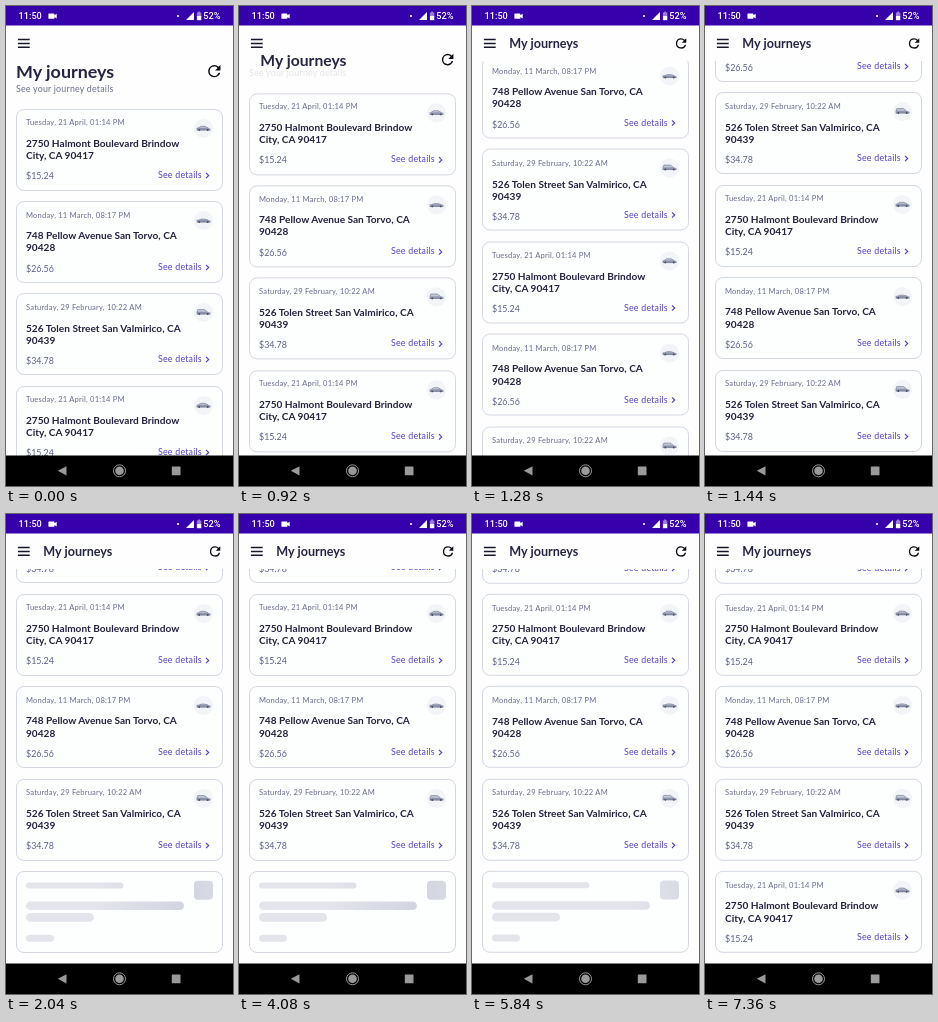
An HTML page for the animation above (8.04 s loop, 227 px wide and 480 px high).

```html
<!DOCTYPE html>
<html lang="en">
<head>
<meta charset="utf-8">
<title>My journeys</title>
<style>
  html, body { margin: 0; width: 100%; height: 100%; overflow: hidden; background: #fff; }
  #stage { position: relative; width: 227px; height: 480px; overflow: hidden; background: #fdfefd; font-family: Lato, sans-serif; }
  #stage * { position: absolute; white-space: nowrap; }
  #stage br { position: static; }
  svg { left: 0; top: 0; overflow: visible; }

  .clock { top: 5px; color: #fff; font: 500 9.2px/10px Roboto, sans-serif; }

  #title { left: 10px; top: 55px; font-weight: 700; font-size: 17.9px; line-height: 20px; color: #262444; transform-origin: 0 50%; }
  #sub { left: 10px; top: 77.5px; font-size: 8.83px; line-height: 10px; letter-spacing: .22px; color: #6a6d8a; }

  .view { left: 0; top: 55px; width: 227px; height: 395px; overflow: hidden; }
  #list { left: 0; top: -55px; }
  .card { left: 10px; width: 207px; height: 82px; box-sizing: border-box; border: 1px solid #d4d7e2; border-radius: 8px; background: #fdfefe; }
  .card > * { margin: -1px; }
  .date { left: 10px; top: 9.8px; font-size: 7.57px; line-height: 10px; letter-spacing: .21px; color: #686b89; }
  .place { left: 10px; top: 28.4px; font-weight: 700; font-size: 10.1px; line-height: 12.2px; color: #24223f; }
  .price { left: 10px; top: 62.7px; font-size: 8.9px; line-height: 10px; color: #5d6287; }
  .more { left: 142px; top: 61px; font-size: 8.83px; line-height: 10px; letter-spacing: .22px; color: #5640c4; }
  .bones .bg { fill: #fdfefe; }
</style>
</head>
<body>
<div id="stage">
  <div class="view"><div id="list"></div></div>

  <div id="sub">See your journey details</div>
  <div id="title">My journeys</div>
  <svg width="227" height="56">
    <path d="M11.9 33.6h11.8M11.9 37.4h11.8M11.9 41.2h11.8" stroke="#17162b" stroke-width="1.5"/>
    <path id="refresh" fill="#0c0b14" d="M17.65 6.35A7.96 7.96 0 0 0 12 4a8 8 0 1 0 7.73 10h-2.08A6 6 0 1 1 12 6c1.66 0 3.14.69 4.22 1.78L13 11h7V4z"/>
  </svg>

  <svg width="227" height="20" fill="#fff">
    <path d="M0 0h227v19.4H0z" fill="#3700ad"/>
    <path d="M43 7.400h4.800a.6.6 0 0 1 .6.6v1.200l2.300-1.500v4.800l-2.300-1.500v1.200a.6.6 0 0 1-.6.6H43a.6.6 0 0 1-.6-.6V8a.6.6 0 0 1 .6-.6z"/>
    <circle cx="172" cy="10" r="1.1"/>
    <path d="M188 6v8h-8z"/>
    <path d="M192.200 5.600h1.800v.9h1.300V10h-4.400V6.500h1.300z" opacity=".5"/>
    <path d="M190.900 10h4.400v4.200h-4.400z"/>
  </svg>
  <div class="clock" style="left:12.5px">11:50</div>
  <div class="clock" style="left:197.3px">52%</div>

  <svg width="227" height="480" fill="#9a9a9a">
    <path d="M0 449.600h227V480H0z" fill="#000"/>
    <path d="M60.500 460.200v9.200l-8.700-4.600z"/>
    <circle cx="113.500" cy="464.800" r="6" fill="none" stroke="#9a9a9a"/>
    <circle cx="113.500" cy="464.800" r="4.300"/>
    <rect x="165.800" y="460.500" width="8.700" height="8.700" rx=".5"/>
  </svg>

  <svg width="0" height="0">
    <linearGradient id="shine" gradientUnits="userSpaceOnUse" x1="-90" x2="90" y1="0" y2="0">
      <stop offset="0" stop-color="#e4e5eb"/>
      <stop offset=".5" stop-color="#d1d4df"/>
      <stop offset="1" stop-color="#e4e5eb"/>
    </linearGradient>
  </svg>
</div>

<script>
const LOOP = 8040, STEP = 40;
const TOP = 102.5, PITCH = 92.4, FOLD = 37.5;
const PAGE_END = 300, LIST_END = 577.2;
const LOADED = { 6: 4240, 9: 7160 };

const trips = [
  { date: 'Tuesday, 21 April, 01:14 PM', place: '2750 Halmont Boulevard Brindow<br>City, CA 90417', price: '$15.24',
    roof: 'M182 19l2.800-1.700h4.200l3.500 1.900' },
  { date: 'Monday, 11 March, 08:17 PM', place: '748 Pellow Avenue San Torvo, CA<br>90428', price: '$26.56',
    roof: 'M183 19l2.500-.9h3l3.500 1' },
  { date: 'Saturday, 29 February, 10:22 AM', place: '526 Tolen Street San Valmirico, CA<br>90439', price: '$34.78',
    roof: 'M181 19l.8-2.400h6.700l3 2.400' }
];

const bar = (x, y, w, h, r) => `<rect x="${x}" y="${y}" width="${w}" height="${h}" rx="${r}" fill="url(#shine)"/>`;

const bones = i => `<svg class="bones" id="bones${i}" width="207" height="82">
  <rect class="bg" x="2" y="2" width="203" height="78" rx="7"/>
  ${bar(10, 11.5, 97.5, 6, 3)}${bar(10, 30.4, 158, 8.6, 4.3)}${bar(10, 42, 68, 8.8, 4.4)}
  ${bar(10, 63.8, 28, 7, 3.5)}${bar(178, 9.8, 19, 19, 4)}</svg>`;

const card = i => {
  const { date, place, price, roof } = trips[i % 3];
  return `<div class="card" style="top:${TOP + i * PITCH}px">
    <div class="date">${date}</div><div class="place">${place}</div>
    <div class="price">${price}</div><div class="more">See details</div>
    <svg width="207" height="82" fill="none">
      <circle cx="187.5" cy="19.5" r="9.6" fill="#f3f4f8"/>
      <path d="${roof}" fill="#c3c8d6" stroke="#6a7089" stroke-width=".6"/>
      <path d="M180.600 18.800h11l2.900.9v1.500h-13.900z" fill="#8f95aa"/>
      <path d="M180.800 21.100h13.500" stroke="#656b84" stroke-width=".6"/>
      <g fill="#454b66"><circle cx="183.300" cy="21" r=".9"/><circle cx="191.700" cy="21" r=".9"/></g>
      <path d="M190 63.800l2.700 2.700-2.700 2.700" stroke="#5640c4" stroke-width="1.200"/>
    </svg>${i in LOADED ? bones(i) : ''}</div>`;
};

const $ = id => document.getElementById(id);
const clamp = v => Math.min(1, Math.max(0, v));
const mix = (a, b, p) => a + (b - a) * p;

$('list').innerHTML = Array.from({ length: 10 }, (_, i) => card(i)).join('');
const cards = [...$('list').children];

// Finger drag through the first page, then a fling to the end of the list.
const drag = [[860, 0], [960, 26], [1120, 88], [1440, 201], [1600, 280], [1700, PAGE_END]];

function scrollAt(t) {
  if (t > 4890) return mix(LIST_END, PAGE_END, (1 - clamp((t - 4890) / 830)) ** 4.8);
  const k = drag.findIndex(p => t < p[0]);
  if (k === 0) return 0;
  if (k < 0) return PAGE_END;
  const [t0, y0] = drag[k - 1], [t1, y1] = drag[k];
  return mix(y0, y1, (t - t0) / (t1 - t0));
}

function draw(t) {
  const y = scrollAt(t), p = clamp(y / FOLD);
  $('list').style.transform = `translateY(${-y}px)`;
  $('title').style.transform = `translate(${27.3 * p}px, ${-27.7 * p}px) scale(${mix(1, .704, p)})`;
  $('sub').style.transform = `translateY(${-FOLD * p}px)`;
  $('sub').style.opacity = clamp(1 - 2 * p);
  $('refresh').setAttribute('transform',
    `translate(${mix(208.3, 209.1, p)} ${mix(65.2, 37.4, p)}) scale(${mix(.77, .65, p)}) translate(-12 -12)`);

  const from = t < 4500 ? 1720 : 6460;
  const phase = ((t - from) % 1020 + 1020) % 1020;
  $('shine').setAttribute('gradientTransform', `translate(${.84 * phase - 100})`);
  for (const i in LOADED) $('bones' + i).style.display = t < LOADED[i] ? '' : 'none';
  cards.forEach((c, i) => c.style.visibility = i > 6 && t < LOADED[6] ? 'hidden' : '');
}

const start = performance.now();
function tick() {
  const t = (performance.now() - start) % LOOP;
  draw(Math.floor(t / STEP) * STEP);
  requestAnimationFrame(tick);
}
tick();
</script>
</body>
</html>
```
